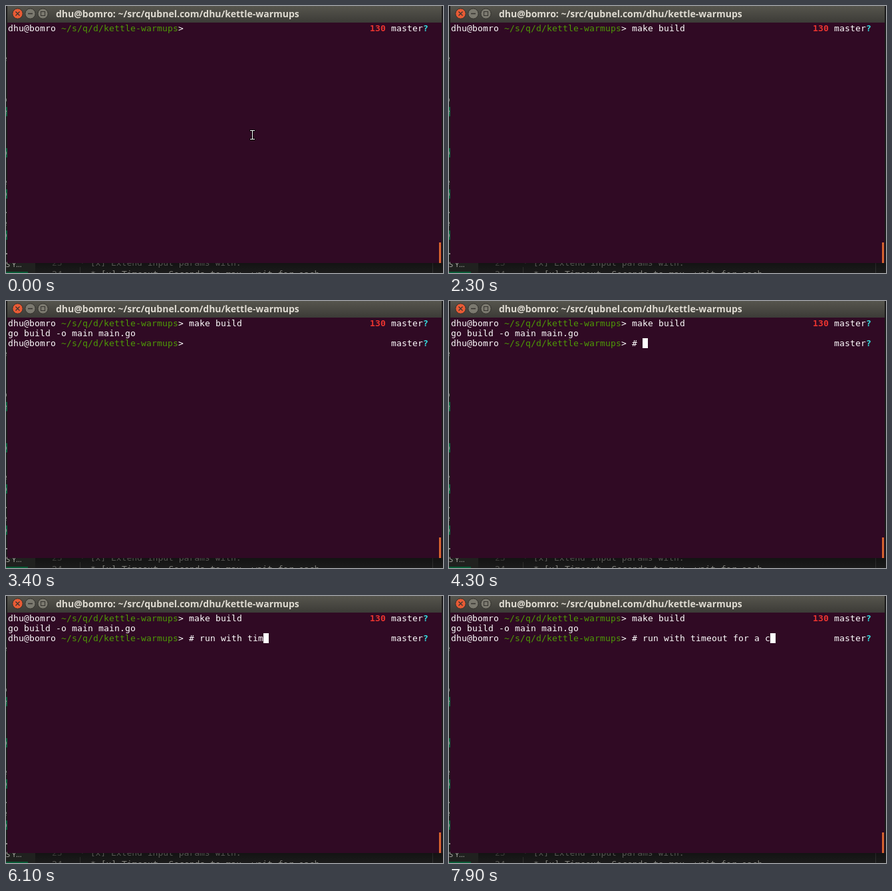
Animation of 657x402 px, one loop 8000 ms. Source, as an HTML page with a canvas:

```html
<!DOCTYPE html>
<html lang="en">
<head>
<meta charset="utf-8">
<title>Terminal</title>
<style>
html, body { margin: 0; width: 100%; height: 100%; overflow: hidden; background: #1b1b1b; }
canvas { display: block; }
</style>
</head>
<body>
<canvas id="stage" width="657" height="402"></canvas>
<script>
const ctx = document.getElementById('stage').getContext('2d');
const LOOP = 8000;
const MONO = '"DejaVu Sans Mono", monospace';
const SANS = '"Open Sans", "Noto Sans", sans-serif';
const CELL = 8, ROW = 15, LEFT = 3, TOP = 26, PROMPT = 34;
const HOME = 'dhu@bomro: ~/src/qubnel.com/dhu/kettle-warmups';

// Commands and the moment each character appears.
const first = {
  text: 'make build',
  keys: [400, 600, 700, 800, 900, 1100, 1300, 1400, 1600, 1700]
};
const second = {
  text: '# run with timeout for a c',
  keys: [4100, 4300, 4600, 4700, 4900, 5000, 5200, 5300, 5500, 5600, 5600, 5800, 5900,
    6100, 6200, 6400, 6400, 6600, 6800, 6900, 7000, 7100, 7200, 7500, 7600, 7900]
};

function rect(x, y, w, h, color) {
  ctx.fillStyle = color;
  ctx.fillRect(x, y, w, h);
}

function label(text, x, y, font, color) {
  ctx.font = font;
  ctx.fillStyle = color;
  ctx.fillText(text, x, y);
}

function cells(text, col, row, color, bold) {
  ctx.font = (bold ? 'bold ' : '') + '13px ' + MONO;
  ctx.fillStyle = color;
  [...text].forEach((ch, i) => ctx.fillText(ch, LEFT + (col + i) * CELL, TOP + row * ROW + 12));
}

function block(col, row) {
  rect(LEFT + col * CELL, TOP + row * ROW, CELL, ROW, '#ffffff');
}

function typed(line, t) {
  return line.text.slice(0, line.keys.filter(k => k <= t).length);
}

function backdrop() {
  rect(0, 0, 657, 402, '#1b1b1b');
  for (let y = 152; y < 350; y += 62) rect(0, y, 2, 14, '#09613a');
  [79, 141, 159, 221, 265, 283, 327, 345].forEach((y, i) =>
    label('eo'[i % 2], -6, y + 4, '13px ' + MONO, '#8b8b87'));
  rect(0, 372, 2, 2, '#8b8b87');
  rect(0, 310, 1, 2, '#8b8b87');

  rect(0, 387, 44, 15, '#20211f');
  rect(0, 400, 33, 2, '#075a35');
  label('S Y…', 0, 393, '11px ' + SANS, '#b4b4ae');
  const code = '13px ' + MONO;
  label('23', 69, 391, code, '#4c4c49');
  label('* [x] Extend input params with:', 111, 391, code, '#70706b');
  label('24', 69, 408, code, '#5a5a56');
  label('* [x] Timeout. Seconds to max. wait for each', 127, 408, code, '#85857f');
  rect(111, 393, 1, 9, '#333331');
  rect(641, 387, 1, 15, '#343434');
  const shade = ctx.createLinearGradient(0, 387, 0, 402);
  shade.addColorStop(0, 'rgba(0,0,0,0.3)');
  shade.addColorStop(1, 'rgba(0,0,0,0)');
  rect(44, 387, 613, 15, shade);
}

function button(x, fill) {
  ctx.beginPath();
  ctx.arc(x, 11.5, 7.7, 0, Math.PI * 2);
  ctx.fillStyle = fill;
  ctx.fill();
  ctx.strokeStyle = '#302f2b';
  ctx.lineWidth = 1;
  ctx.stroke();
}

function titleBar(title) {
  const bar = ctx.createLinearGradient(0, 0, 0, 25);
  bar.addColorStop(0, '#56554d');
  bar.addColorStop(1, '#3c3b37');
  rect(2, 0, 653, 25, bar);
  button(17.5, '#e95b35');
  button(36.5, '#7b796f');
  button(55.5, '#7b796f');
  ctx.strokeStyle = '#35332f';
  ctx.lineWidth = 1.3;
  ctx.beginPath();
  ctx.moveTo(14.5, 8.5); ctx.lineTo(20.5, 14.5);
  ctx.moveTo(20.5, 8.5); ctx.lineTo(14.5, 14.5);
  ctx.moveTo(33, 11.5); ctx.lineTo(40, 11.5);
  ctx.stroke();
  ctx.lineWidth = 1;
  ctx.strokeRect(52.5, 8.5, 6, 6);
  label(title, 75, 17, 'bold 14px ' + SANS, '#dfdbd2');
}

function prompt(row) {
  cells('dhu@bomro', 0, row, '#ffffff');
  cells('~/s/q/d/kettle-warmups', 10, row, '#4e9a06');
  cells('>', 32, row, '#ffffff');
}

function branch(row) {
  cells('master', 72, row, '#ffffff');
  cells('?', 78, row, '#34e2e2', true);
}

function pointer() {
  const beam = () => {
    ctx.beginPath();
    ctx.moveTo(367.5, 187.5); ctx.lineTo(373.5, 187.5);
    ctx.moveTo(370.5, 187.5); ctx.lineTo(370.5, 200.5);
    ctx.moveTo(367.5, 200.5); ctx.lineTo(373.5, 200.5);
    ctx.stroke();
  };
  ctx.lineCap = 'square';
  ctx.strokeStyle = '#0b0309';
  ctx.lineWidth = 3;
  beam();
  ctx.strokeStyle = '#ffffff';
  ctx.lineWidth = 1;
  beam();
  ctx.lineCap = 'butt';
}

function draw(t) {
  backdrop();
  rect(2, 25, 653, 362, '#300a24');
  rect(651, 356, 3, 31, '#d5632f');
  titleBar(t >= 2700 && t < 2900 ? 'make build' : HOME);

  prompt(0);
  cells('130', 68, 0, '#e93430', true);
  branch(0);
  const command = typed(first, t);
  cells(command, PROMPT, 0, '#ffffff');

  if (t < 300) pointer();
  else if (t < 2300) block(PROMPT + command.length, 0);

  if (t >= 2700) cells('go build -o main main.go', 0, 1, '#ffffff');
  if (t >= 2700 && t < 2900) block(0, 2);
  if (t >= 2900) {
    const note = typed(second, t);
    prompt(2);
    cells(note, PROMPT, 2, '#ffffff');
    if (t < 3400 || t >= 3900) block(PROMPT + note.length, 2);
  }
  if (t >= 3000) branch(2);
}

const start = performance.now();
function tick() {
  draw((performance.now() - start) % LOOP);
  requestAnimationFrame(tick);
}
tick();
</script>
</body>
</html>
```
